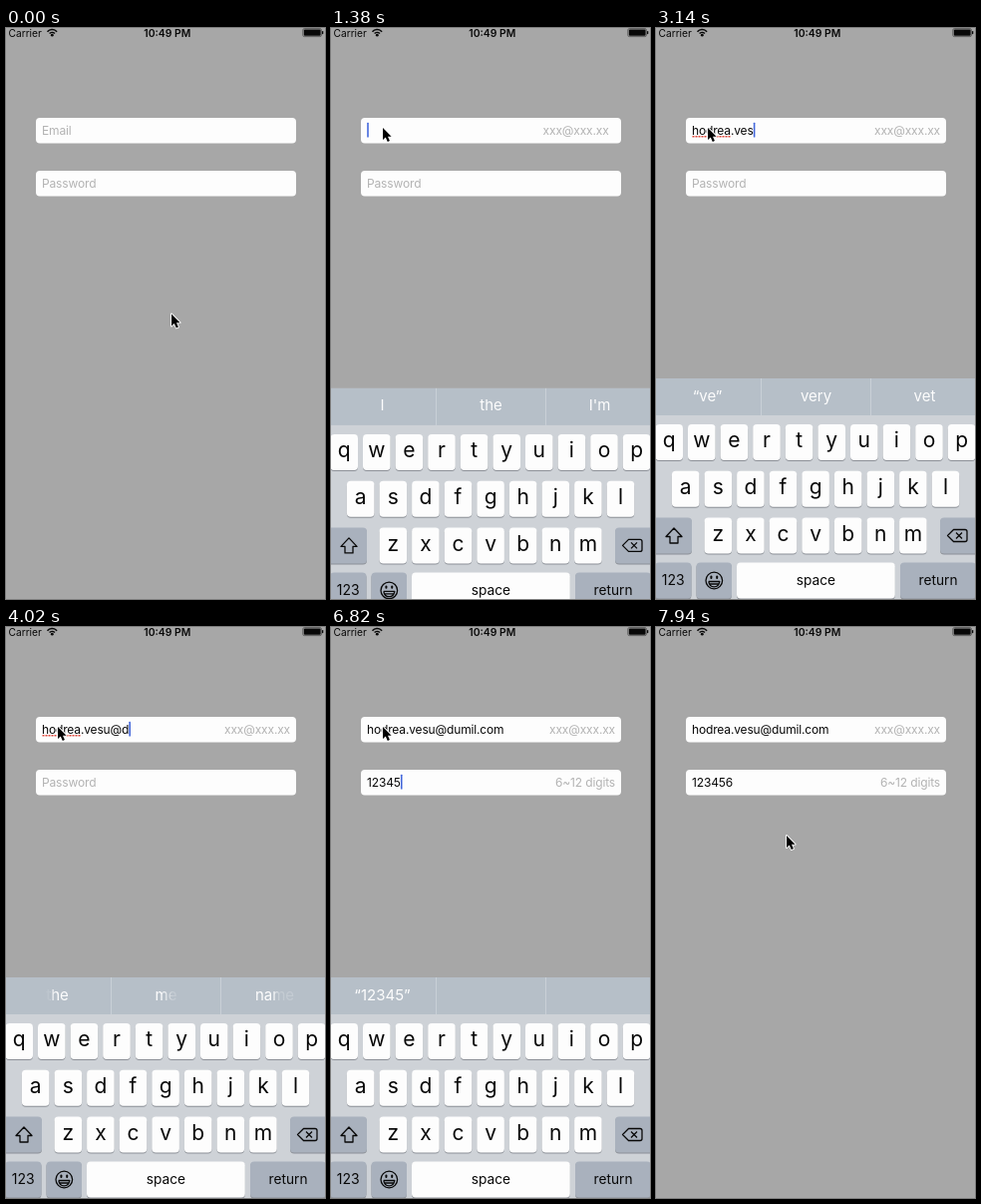
Recreate the animation shown at these times as an HTML page with a canvas. Size 320x572 px, loop 8 s.

```html
<!DOCTYPE html>
<html lang="en">
<head>
<meta charset="utf-8">
<title>Login form</title>
<style>
html, body { margin: 0; width: 100%; height: 100%; overflow: hidden; background: #a7a7a7; }
canvas { display: block; }
</style>
</head>
<body>
<canvas width="320" height="572"></canvas>
<script>
const ctx = document.querySelector('canvas').getContext('2d');
const LOOP = 8000, STEP = 80, LEAD = 20;
const EMAIL_FOCUS = 1220, PASS_FOCUS = 5300, BLUR = 7700;
const WHITE = '#fdfdfd', GREY = '#b3b3b3', BLACK = '#080808';

// Times at which each character of a field is typed
const email = {
  y: 90, label: 'Email', hint: 'xxx@xxx.xx', text: 'hodrea.vesu@dumil.com', from: EMAIL_FOCUS, to: PASS_FOCUS,
  keys: [1620, 1700, 1780, 1940, 2020, 2260, 2340, 2580, 2820, 3060, 3300, 3700, 4020,
    4420, 4500, 4580, 4660, 4740, 4900, 5060, 5140]
};
const password = {
  y: 143, label: 'Password', hint: '6~12 digits', text: '123456', from: PASS_FOCUS, to: BLUR - STEP,
  keys: [6020, 6260, 6420, 6580, 6740, 6900]
};
const suggestions = [
  [0, 'I', 'the', "I'm"], [1620, '“h”', 'he', 'how'], [2340, 'I', 'the', "I'm"],
  [2580, '“v”', 'very', 'vet'], [2820, '“ve”', 'very', 'vet'], [3300, '“vesu”'],
  [3700, 'the', 'me', 'name'], [4100, '“d”'], [4420, '“du”'], [5380],
  [6020, '“1”'], [6260, '“12”'], [6420, '“123”'], [6580, '“1234”'], [6740, '“12345”'],
  [6980], [7220, '“123456”']
];

const clamp = v => Math.max(0, Math.min(1, v));
const smooth = v => (v = clamp(v), v * v * (3 - 2 * v));
const since = (t, start) => (t - start) / 1000 + 0.035;

function spring(u) {
  const a = 13.4, b = 11;
  return u <= 0 ? 0 : 1 - Math.exp(-a * u) * (Math.cos(b * u) + a / b * Math.sin(b * u));
}

// Critically damped remainder, 1 to 0
function settle(u) {
  const r = (1 + 25 * u) * Math.exp(-25 * u);
  return r < 0.01 ? 0 : r;
}

function font(size, weight = 400) {
  ctx.font = `${weight} ${size}px Inter, Roboto, sans-serif`;
  ctx.letterSpacing = size === 12 ? '-0.15px' : '0px';
}

function text(str, x, y, color, align = 'left') {
  ctx.fillStyle = color;
  ctx.textAlign = align;
  ctx.fillText(str, x, y);
}

function box(x, y, w, h, r, color) {
  ctx.fillStyle = color;
  ctx.beginPath();
  ctx.roundRect(x, y, w, h, r);
  ctx.fill();
}

function line(path, color = BLACK, width = 1.3) {
  ctx.strokeStyle = color;
  ctx.lineWidth = width;
  ctx.lineJoin = 'round';
  ctx.stroke(new Path2D(path));
}

function statusBar() {
  font(10.2);
  text('Carrier', 2.5, 8.5, BLACK);
  font(10.4, 600);
  text('10:49 PM', 161.8, 8.5, BLACK, 'center');
  ctx.strokeStyle = BLACK;
  ctx.lineWidth = 1.5;
  for (const r of [3.6, 6.4]) {
    ctx.beginPath();
    ctx.arc(46.3, 8, r, -Math.PI * 0.77, -Math.PI * 0.23);
    ctx.stroke();
  }
  ctx.fillStyle = BLACK;
  ctx.beginPath();
  ctx.arc(46.3, 7.2, 1.4, 0, 7);
  ctx.fill();
  ctx.strokeStyle = '#444';
  ctx.lineWidth = 0.7;
  ctx.beginPath();
  ctx.roundRect(297.8, 0.6, 18.6, 8, 1.5);
  ctx.stroke();
  box(298.8, 1.4, 16.8, 6.4, 1, BLACK);
  box(317, 3, 1.3, 3.2, 0.6, BLACK);
}

function field(f, t) {
  const { y } = f, base = y + 17;
  box(30, y, 261, 25.5, 4, WHITE);
  font(12);
  const u = since(t, f.from), focused = t >= f.from;
  const end = 285 - ctx.measureText(f.hint).width;
  const x = 36 + (end - 36) * (focused ? spring(u) : 0);
  const mix = focused ? clamp(u * 6 - 0.1) : 0;
  ctx.globalAlpha = 1 - mix;
  text(f.label, x, base, GREY);
  ctx.globalAlpha = mix;
  text(f.hint, x, base, GREY);
  ctx.globalAlpha = 1;

  const typed = f.text.slice(0, f.keys.filter(k => k <= t).length);
  text(typed, 36, base, BLACK);
  if (f === email && t >= 2580 && t < PASS_FOCUS) {
    ctx.fillStyle = '#e0483c';
    for (let d = 36.5; d < 74; d += 3) ctx.fillRect(d, 108, 2, 1.5);
  }
  if (focused && t < f.to) {
    box(36.2 + ctx.measureText(typed).width, y + 4.8, 1.6, 14.6, 0.5, '#4468dc');
  }
}

function key(x, y, w, label, size, dark) {
  box(x, y + 1, w, 36, 4, '#8c9097');
  box(x, y, w, 36, 4, dark ? '#a9b1bd' : WHITE);
  if (!label) return;
  font(size);
  text(label, x + w / 2, y + (size > 20 ? 23 : 22.5), BLACK, 'center');
}

function suggestionBar(t) {
  ctx.fillStyle = '#b6bfc8';
  ctx.fillRect(0, 0, 320, 37);
  ctx.fillStyle = '#c9d0d7';
  ctx.fillRect(105, 0, 1, 37);
  ctx.fillRect(215, 0, 1, 37);
  font(15);
  const words = suggestions.filter(s => s[0] <= t).pop().slice(1);
  const wiping = t >= 4020 && t < 4100;
  words.forEach((word, i) => {
    const x = [51.5, 160.5, 269.5][i];
    let fill = WHITE;
    if (wiping) {
      // Words vanish from one side to the other
      fill = ctx.createLinearGradient(x - 20, 0, x + 20, 0);
      const stops = [[0.1, 0.4], [1, 0.2], [1, 0.2]][i];
      const edges = [[0.3, 0.42], [0.38, 0.68], [0.46, 0.62]][i];
      stops.forEach((a, k) => fill.addColorStop(edges[k], `rgba(253,253,253,${i ? a : k ? 1 : a})`));
    }
    text(word, x, 22.5, fill, 'center');
  });
}

function keyboard(t) {
  if (t < EMAIL_FOCUS) return;
  const left = t < BLUR ? settle(since(t, EMAIL_FOCUS)) : 1 - settle(since(t, BLUR));
  if (left === 1) return;
  ctx.save();
  ctx.translate(0, 351 + 221 * left);
  ctx.fillStyle = '#ced2d7';
  ctx.fillRect(0, 0, 320, 222);
  suggestionBar(t);

  const rows = [['qwertyuiop', 13.2, 46], ['asdfghjkl', 29.7, 92.8], ['zxcvbnm', 62.3, 139.6]];
  for (const [letters, x, y] of rows) {
    [...letters].forEach((c, i) => key(x + 32.6 * i - 13.8, y, 27.6, c, 21));
  }
  key(-4, 139.6, 40, '', 0, true);
  key(285, 139.6, 40, '', 0, true);
  key(-1, 184.6, 36.5, '123', 14, true);
  key(40.5, 184.6, 35.5, '', 0, true);
  key(81, 184.6, 158.8, 'space', 13.7);
  key(245, 184.6, 76, 'return', 13.7, true);

  line('M18 150 L26 158.5 H22 V165 H14 V158.5 H10 Z');
  line('M292.5 157.5 L298.5 151.5 H310 Q312 151.5 312 153.5 V161.5 Q312 163.5 310 163.5 H298.5 Z');
  line('M301 154.5 l6 6 m0 -6 l-6 6');
  line('M50 202.5 a8.3 8.3 0 1 0 16.6 0 a8.3 8.3 0 1 0 -16.6 0 M52.8 203.5 H63.8 Q63 208.8 58.3 208.8 Q53.6 208.8 52.8 203.5 M54 206 H62.6');
  box(54.4, 197.5, 2, 3.4, 1, BLACK);
  box(60.2, 197.5, 2, 3.4, 1, BLACK);
  ctx.restore();
}

function pointer(t) {
  const a = smooth((t - 420) / 560), b = smooth((t - 7140) / 400);
  ctx.save();
  ctx.translate(166 - 114 * a + 79 * b, 286.5 - 186.5 * a + 109 * b);
  const arrow = 'M0 0 V12 L2.8 9.4 L4.8 14 L6.9 13.1 L5 8.7 H8.6 Z';
  line(arrow, '#fff', 1.8);
  ctx.fillStyle = '#000';
  ctx.fill(new Path2D(arrow));
  ctx.restore();
}

function draw(now) {
  const t = Math.floor((now % LOOP - LEAD) / STEP) * STEP + LEAD;
  ctx.fillStyle = '#a7a7a7';
  ctx.fillRect(0, 0, 320, 572);
  statusBar();
  field(email, t);
  field(password, t);
  keyboard(t);
  pointer(t);
}

const start = performance.now();
function tick() {
  draw(performance.now() - start);
  requestAnimationFrame(tick);
}
tick();
</script>
</body>
</html>
```
